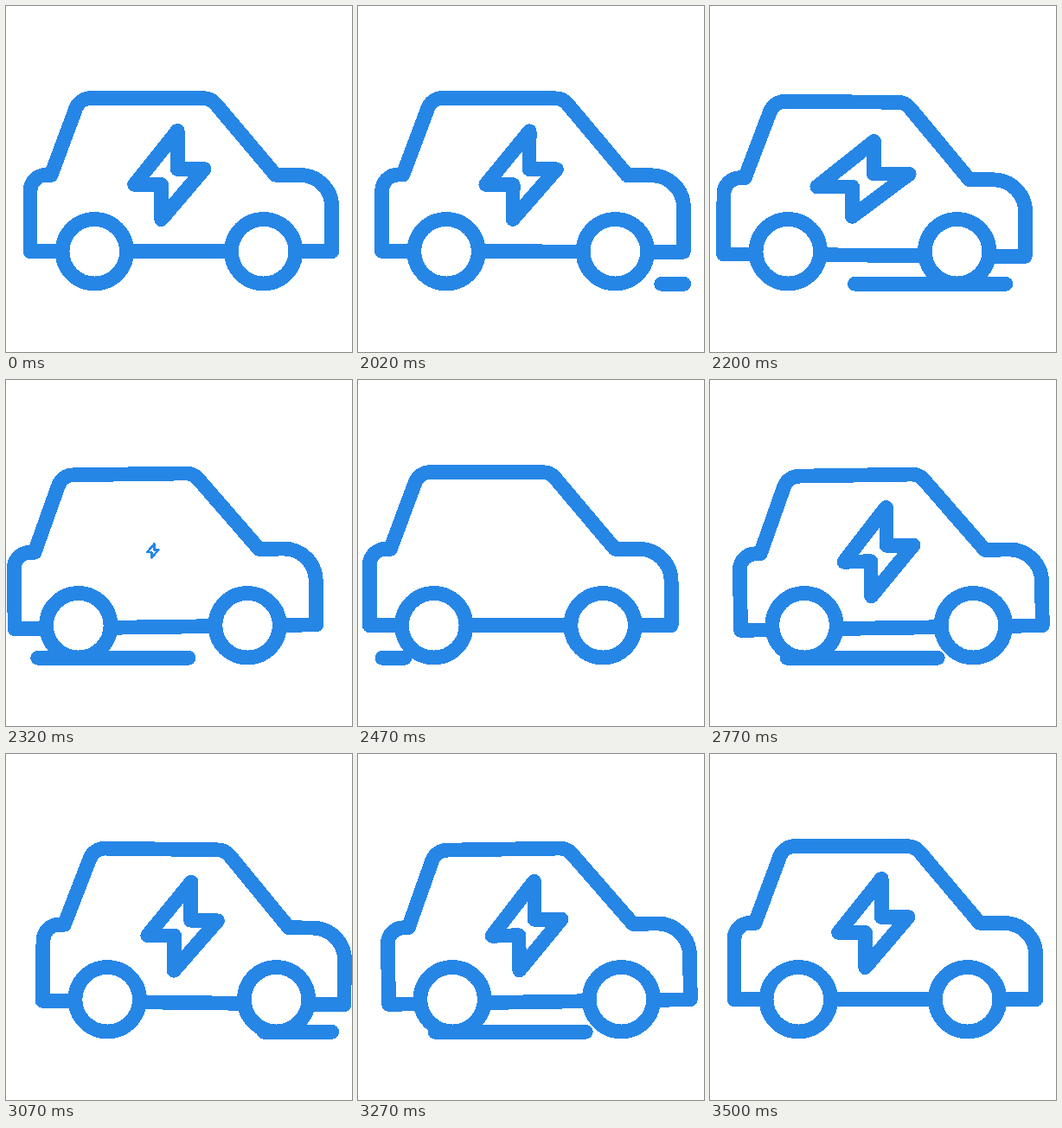
Recreate the animation shown at these times as an HTML page. Size 400 by 400 pixels, loop 3.52 s.

```html
<!DOCTYPE html>
<html lang="en">
<head>
<meta charset="utf-8">
<title>Electric car</title>
<style>
  html, body { margin: 0; width: 100%; height: 100%; overflow: hidden; background: #fff; }
  svg { display: block; width: 100vw; height: 100vh; }
</style>
</head>
<body>
<svg viewBox="0 0 430 430" fill="none" stroke="#2686e6" stroke-width="18" stroke-linecap="round" stroke-linejoin="round" shape-rendering="crispEdges">
  <path id="road"/>
  <g id="car">
    <g id="body">
      <path d="M68 305H30V230A20 20 0 0 1 50 210H56L86.7 127.5A20 20 0 0 1 105.4 114.6H245A20 20 0 0 1 260.5 121.7L335 210H365A40 40 0 0 1 405 250V305H362M152 305H278"/>
      <path id="bolt"/>
    </g>
    <circle cx="110" cy="305" r="40"/>
    <circle cx="320" cy="305" r="40"/>
  </g>
</svg>
<script>
const LOOP = 3520, REST = 2000, STEP = 25, CYCLE = 30;
const el = id => document.getElementById(id);
const road = el('road'), car = el('car'), body = el('body'), bolt = el('bolt');

// Smooth and straight rise from 0 to 1 between times a and b, in 1/60 s
const ramp = (a, b, t) => Math.min(1, Math.max(0, (t - a) / (b - a)));
const rise = (a, b, t) => { const s = ramp(a, b, t); return s * s * (3 - 2 * s); };

// Back, forward, then home
const drive = t => -20 * rise(0, 20, t) + 37 * rise(20, 60, t) - 17 * rise(60, 90, t);

// One bump per cycle: the front dips first, then the rear
const sink = p => 5.7 * (rise(1, 6.3, p) - rise(7, 27, p));
const tilt = p => 0.9 * rise(0, 6, p) - 1.85 * rise(9.5, 17, p) + 0.95 * rise(17, 28, p);

function drawRoad(p) {
  const head = 405 - 375 * ramp(0, 20, p);
  const tail = 405 - 375 * ramp(10, 30, p);
  road.setAttribute('d', tail > head ? `M${tail} 345.4H${head}` : '');
}

// The bolt is squashed, shrinks away and grows back
function drawBolt(t) {
  const size = 1 - rise(12, 22, t) + rise(30, 45, t);
  const squash = rise(0, 12, t) - rise(12, 22, t);
  const w = size * (1 + 0.32 * squash), h = size * (1 - 0.15 * squash);
  const at = (x, y) => `${203 + x * w} ${210.2 + y * h}`;
  const pts = [at(10, -55), at(10, -7.6), at(43.3, -7.6), at(-10, 55), at(-10, 11.8), at(-43.3, 11.8)];
  bolt.setAttribute('d', `M${pts.join('L')}Z`);
  bolt.setAttribute('stroke-width', 18 * size);
  bolt.setAttribute('visibility', size > 0.02 ? 'visible' : 'hidden');
}

function draw(ms) {
  const now = Math.floor((ms % LOOP) / 10) * 10;
  const step = Math.max(0, Math.floor((now - REST + 5) / STEP));
  const t = Math.min(90, step * 1.5), p = t % CYCLE;
  car.setAttribute('transform', `translate(${drive(t)} 0)`);
  body.setAttribute('transform', `translate(0 ${sink(p)}) rotate(${tilt(p)} 217.5 245)`);
  drawRoad(p);
  drawBolt(t);
}

const start = performance.now();
function tick() {
  draw(performance.now() - start);
  requestAnimationFrame(tick);
}
tick();
</script>
</body>
</html>
```
